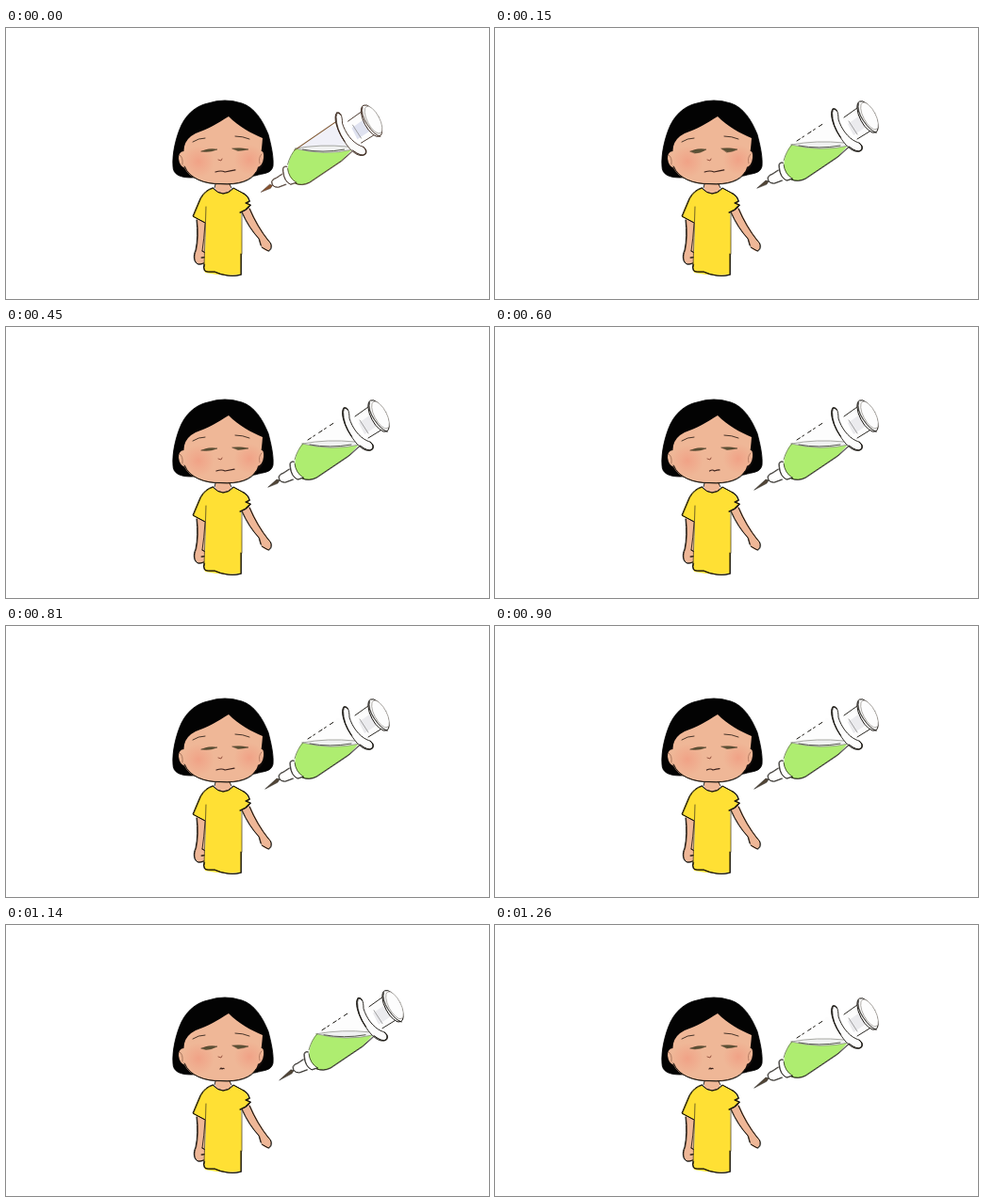
Write an HTML page with a canvas that moves like this. It is 512 by 288 pixels and loops after 1.29 s.

```html
<!DOCTYPE html>
<html lang="en">
<head>
<meta charset="utf-8">
<title>Vaccination</title>
<style>
  html, body { margin: 0; width: 100%; height: 100%; overflow: hidden; background: #fff; }
  canvas { display: block; width: 100vw; height: 100vh; }
</style>
</head>
<body>
<canvas id="stage" width="512" height="288"></canvas>
<script>
const ctx = document.getElementById('stage').getContext('2d');
const LOOP = 1290;
const INK = '#14110c', SKIN = '#efb797', YELLOW = '#ffe034', GREEN = '#aeed70';

// Keys are [time, value] pairs, eased in between.
const SLIDE = [[0, -7.5], [30, -7.5], [100, 0], [210, 0], [300, 13], [390, 0],
  [615, 0], [705, 15], [795, 0], [1050, 0], [1140, 15], [1230, 0], [LOOP, 0]];
const MOUTH_LEFT = [[0, 222], [540, 223], [600, 227.5], [660, 227], [780, 223], [840, 223], [990, 227], [LOOP, 227]];
const MOUTH_RIGHT = [[0, 243], [540, 242], [600, 238], [660, 237], [780, 242], [840, 242], [990, 231], [LOOP, 231]];
const EYE_OPEN = [[0, 1], [90, 1.4], [150, 2.6], [240, 2.2], [360, 1], [900, 1], [1020, 2.6], [1110, 2], [1260, 1.4], [LOOP, 1]];

function track(keys, t) {
  const i = keys.findIndex(k => k[0] > t);
  const [t0, v0] = keys[i - 1], [t1, v1] = keys[i];
  const u = (t - t0) / (t1 - t0);
  return v0 + (v1 - v0) * u * u * (3 - 2 * u);
}

function shape(d, fill, stroke, width = 1.1) {
  const path = new Path2D(d);
  if (fill) { ctx.fillStyle = fill; ctx.fill(path); }
  if (stroke) { ctx.strokeStyle = stroke; ctx.lineWidth = width; ctx.stroke(path); }
}

function line(d, width = 1, color = INK) {
  shape(d, null, color, width);
}

// A second, shifted stroke gives the uneven weight of a pen.
function pen(d, width = 1, color = INK) {
  line(d, width, color);
  ctx.save();
  ctx.translate(.6, .3);
  line(d, width * .7, color);
  ctx.restore();
}

function oval(x, y, rx, ry, angle, fill, stroke, width = 1.1) {
  ctx.beginPath();
  ctx.ellipse(x, y, rx, ry, angle, 0, 2 * Math.PI);
  if (fill) { ctx.fillStyle = fill; ctx.fill(); }
  if (stroke) { ctx.strokeStyle = stroke; ctx.lineWidth = width; ctx.stroke(); }
}

function blush(x, y, r) {
  const glow = ctx.createRadialGradient(x, y, 1, x, y, r);
  glow.addColorStop(0, 'rgba(241,150,125,.6)');
  glow.addColorStop(1, 'rgba(241,150,125,0)');
  oval(x, y, r, r, 0, glow);
}

function drawBody() {
  // arms
  shape('M202 202 Q204 222 201 237 C198 242 200 250 205 251 C211 252 215 247 213 242 L210 237 L212 206 Z', SKIN);
  pen('M202 204 Q204 222 201 236 C198 242 199 250 204 251 Q210 251 213 247 M208 237 L213 240 M207 244 L215 243');
  line('M211 208 Q210 224 208 237', .8);
  shape('M250 195 Q256 211 268 224 C269 232 274 238 278 237 C282 235 282 228 278 225 Q267 210 258 190 Z', SKIN);
  pen('M250 196 Q257 212 268 224 L270 231 M258 192 Q266 211 278 226 C282 229 282 235 278 237 L271 233', .9);

  shape('M222 164 L222 177 H238 V164 Z', SKIN);
  line('M222 166 L221 170 M237 166 L239 170', .9);

  // shirt
  shape('M219 170 Q230 182 241 170 L251 175 Q258 180 258 190 L249 196 Q251 230 249 262 Q230 264 211 260 Q209 256 211 240 L212 207 L198 201 Q200 192 206 181 Q211 172 219 170 Z', YELLOW);
  pen('M219 170 Q230 182 241 170 L252 176 M219 170 Q211 172 206 181 L198 200 L211 207');
  pen('M210 251 Q208 259 214 259 L221 259 Q227 262 235 263 Q243 264 249 262 L249 240', 1.1);
  line('M212 190 Q211 224 210 252 M250 196 L250 240', .8, '#51451e');
  pen('M252 176 Q257 179 258 184 L254 186 L259 188 L254 193 L248 196', 1.2);
}

function drawHead(t) {
  shape('M196 159 C185 159 177 156 177 147 C176 134 180 116 186 103 C193 89 204 82 214 80 Q232 74 250 80 C263 84 272 98 278 113 C281 124 284 138 283 147 C281 155 274 154 264 157 Z', '#030303', '#030303', .8);

  // ears and face
  shape('M190 131 Q183 130 183 139 Q184 148 191 149 Z', SKIN);
  shape('M267 132 Q274 128 273 138 Q272 147 266 148 Z', SKIN);
  shape('M236 94 C225 101 213 108 201 112 Q191 117 189 126 Q187 140 189 148 C194 160 211 166 227 166 C247 167 260 162 265 153 C269 145 271 132 272 117 C260 112 247 105 236 94 Z', SKIN);
  pen('M189 147 C194 160 211 166 227 165.5 C247 167 260 162 265 153', .9);
  line('M184 135 Q188 137 187 145 M271 134 Q267 138 269 144', .7, '#8c5c45');
  blush(204, 142, 17);
  blush(258, 140, 16);

  line('M198 121 Q204 117 211 117 M243 115 Q251 115 258 118', .9, '#34251c');

  const open = track(EYE_OPEN, t);
  shape(`M207 131 Q215 127.5 224 129 Q218 ${130.5 + open} 212 ${130.5 + open} Z`, '#5c5236', '#4a3c28', .5);
  shape(`M240 128 Q249 127 257 129 Q252 ${129 + open} 246 ${129.5 + open} Z`, '#5c5236', '#4a3c28', .5);
  line('M225 140 L228 141 L229 139', .9, '#8f4b3a');

  const a = track(MOUTH_LEFT, t), b = track(MOUTH_RIGHT, t), w = b - a;
  line(`M${a} 153 Q${a + w * .3} 151 ${a + w * .48} 153 Q${a + w * .75} 152 ${b} ${153 - w * .1}`, 1.2, '#3a211b');
}

function drawSyringe(t) {
  const slide = track(SLIDE, t);
  const near = slide < -3;
  const ink = near ? '#38251a' : INK;

  ctx.save();
  ctx.translate(slide, slide * -.55);

  // needle and nozzle
  const tip = t < 560 ? '278 170' : '275 173';
  shape(`M${tip} L287 162 L290 163 L288 166 Z`, near ? '#86512d' : '#514536', ink, .5);
  shape('M289 159 Q290 156 295 154 L301 150 L306 160 L296 165 Q290 166 289 159 Z', '#fff');
  pen('M295 165 Q289 165 289 159 Q290 156 294 155 L300 151 M296 165 L304 162', .8, ink);

  // barrel and liquid
  shape('M313 125 L352 98 Q362 104 375 125 Z', near ? '#f0f0f8' : '#fdfdfd');
  shape('M306 147 Q307 134 314 124 L346 128 L375 124 L363 137 L329 160 Q321 164 313 161 Q308 155 306 147 Z', GREEN);
  shape('M314 124 Q341 119 370 122 L375 125 Q346 132 314 124 Z', '#f0f1f1', '#84867d', .7);
  line('M322 125 Q343 129 366 125', 1, '#55584e');
  if (near) line('M313 126 L358 95', 1.2, '#80572e');
  else {
    ctx.setLineDash([4, 3, 2, 5]);
    line('M320 120 L349 101', 1);
    ctx.setLineDash([]);
  }
  line('M306 141 Q309 130 315 124', .9, '#6d8052');
  pen('M374 127 L363 137 L329 160 Q321 164 314 161', .8, ink);
  shape('M301 147 Q301 141 305 143 Q306 155 315 160 Q313 164 308 162 Q301 157 301 147 Z', '#fff');
  pen('M305 143 Q300 142 301 148 Q302 159 309 162 L315 160', .8, ink);
  line('M306 145 Q307 155 315 160', .7, ink);

  // plunger
  shape('M368 94 L385 83 L399 109 L383 118 Z', '#fcfcfc');
  shape('M374 102 L388 92 L395 104 L380 114 Z', near ? '#dfe2f0' : '#ebebee');
  line('M370 95 L384 85 M384 118 L397 110', .9, ink);
  line('M375 99 L384 113', .8, '#8c8c8c');

  // flange
  shape('M358 86 C354 90 358 104 366 116 C374 129 383 134 388 130 C391 126 387 122 383 121 C374 117 367 107 364 97 C364 89 362 84 358 86 Z', '#fcfcfc', ink, .9);
  pen('M362 88 Q358 83 357 90 Q357 103 366 116 M375 126 Q384 133 388 130 Q391 126 386 122', .9, ink);

  // thumb rest
  oval(395, 94.5, 8, 18.5, -.48, '#fff', ink, 1);
  oval(397, 93.5, 6.5, 16, -.48, '#fdfdfd', '#77736c', .6);
  pen('M385 80 Q383 87 390 98 Q398 110 404 111', .7, ink);
  ctx.restore();
}

function draw(now) {
  const t = now % LOOP;
  ctx.fillStyle = '#fff';
  ctx.fillRect(0, 0, 512, 288);
  ctx.lineCap = ctx.lineJoin = 'round';
  drawBody();
  drawHead(t);
  drawSyringe(t);
}

const start = performance.now();
function tick() {
  draw(performance.now() - start);
  requestAnimationFrame(tick);
}
tick();
</script>
</body>
</html>
```
